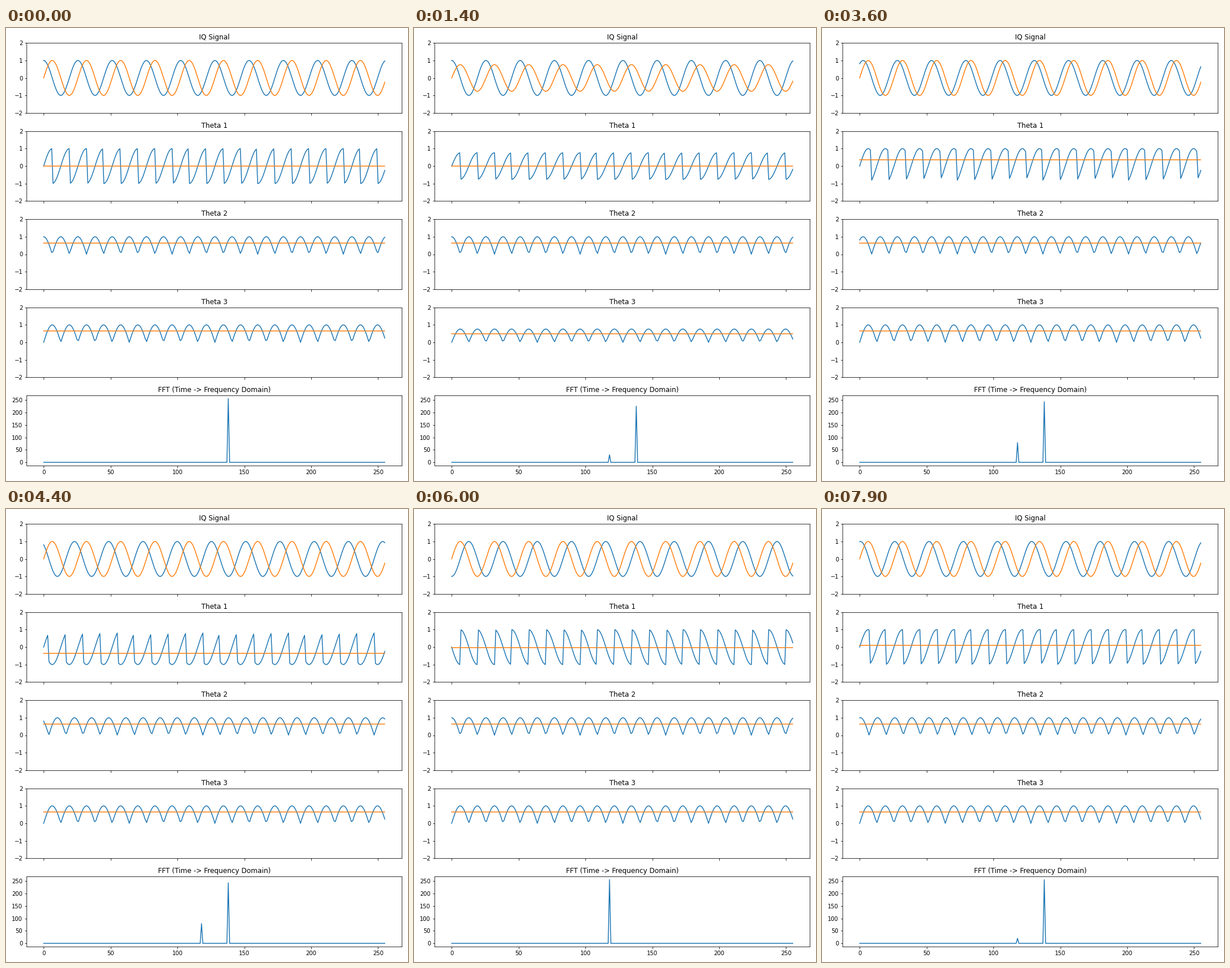
A matplotlib script for the animation above (8000 ms loop, 706 px wide and 794 px high).

```python
import numpy as np
import matplotlib.pyplot as plt
from matplotlib.animation import FuncAnimation

WIDTH, HEIGHT, DPI = 706, 794, 72
LEFT, RIGHT, BOTTOM, TOP = 36.2, 695.2, 27.1, 767.9   # plot area, pixels
PANEL, GAP = 122.9, 31.55
SAMPLES, CYCLES = 256, 10
FRAMES, INTERVAL = 80, 100
GAIN_FRAMES = 20      # gain error first, phase error afterwards
PHASE_PERIOD = 40

n = np.arange(SAMPLES)
angle = 2 * np.pi * CYCLES * n / SAMPLES


def imbalance(frame):
    """Gain of Q and phase of I at a frame."""
    if frame < GAIN_FRAMES:
        return 1 + 0.25 * np.sin(2 * np.pi * frame / GAIN_FRAMES), 0.0
    return 1.0, 2 * np.pi * (frame - PHASE_PERIOD) / PHASE_PERIOD


def with_mean(values):
    return values, np.full(SAMPLES, values.mean())


def curves(frame):
    gain, phase = imbalance(frame)
    i = np.cos(angle + phase)
    q = gain * np.sin(angle)
    spectrum = np.abs(np.fft.fftshift(np.fft.fft(i + 1j * q)))
    return [
        (i, q),
        with_mean(np.sign(i) * q),
        with_mean(np.abs(i)),
        with_mean(np.abs(q)),
        (spectrum,),
    ]


plt.rcParams["font.family"] = "DejaVu Sans"
fig, axes = plt.subplots(5, 1, sharex=True, dpi=DPI,
                         figsize=(WIDTH / DPI, HEIGHT / DPI))
fig.subplots_adjust(left=LEFT / WIDTH, right=RIGHT / WIDTH,
                    bottom=BOTTOM / HEIGHT, top=TOP / HEIGHT,
                    hspace=GAP / PANEL)
titles = ["IQ Signal", "Theta 1", "Theta 2", "Theta 3",
          "FFT (Time -> Frequency Domain)"]

lines = []
for ax, title, group in zip(axes, titles, curves(0)):
    ax.set_title(title)
    lines += [ax.plot(n, values)[0] for values in group]
for ax in axes[:4]:
    ax.set_ylim(-2, 2)
axes[4].set_ylim(axes[4].get_ylim())


def update(frame):
    values = [v for group in curves(frame) for v in group]
    for line, v in zip(lines, values):
        line.set_ydata(v)
    return lines


anim = FuncAnimation(fig, update, frames=FRAMES, interval=INTERVAL,
                     repeat=True, repeat_delay=0)
plt.show()
```
